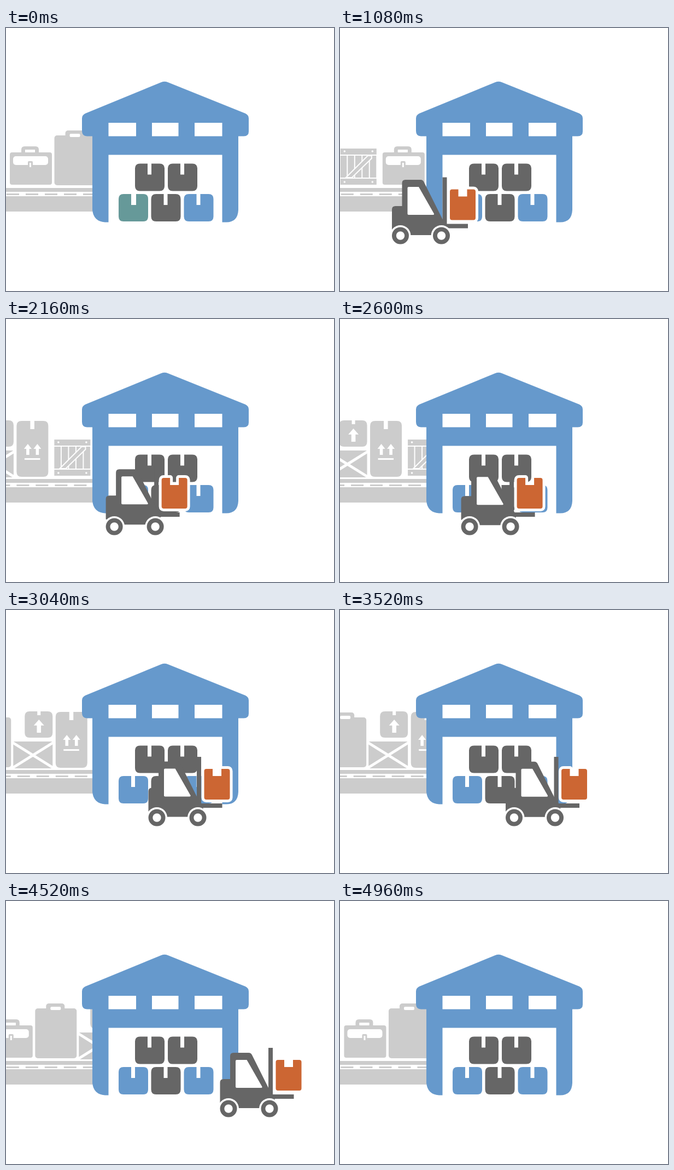
Write an HTML page that moves like this. It is 600 px wide and 480 px high and loops after 5 s.

```html
<!DOCTYPE html>
<html lang="en">
<head>
<meta charset="utf-8">
<title>Warehouse</title>
<style>
html, body { margin: 0; width: 100%; height: 100%; overflow: hidden; background: #fff; }
svg { display: block; width: 600px; height: 480px; }
</style>
</head>
<body>
<svg id="stage" viewBox="0 0 600 480"></svg>
<script>
const LOOP = 5000, STEP = 40;
const BELT_START = 207, BELT_SPEED = 0.0811, BELT_LOOP = 385;
const GREY = '#ccc', DARK = '#666', BLUE = '#69c', TEAL = '#699', ORANGE = '#c63';

const rect = (x, y, w, h, fill, r = 0) =>
  `<rect x="${x}" y="${y}" width="${w}" height="${h}" rx="${r}" fill="${fill}"/>`;
const path = (d, fill, extra = '') => `<path d="${d}" fill="${fill}" ${extra}/>`;
const circle = (x, y, r, fill) => `<circle cx="${x}" cy="${y}" r="${r}" fill="${fill}"/>`;
const group = (id, body) => `<g id="${id}">${body}</g>`;
const shift = (x, y, body) => `<g transform="translate(${x} ${y})">${body}</g>`;

// Rounded carton outline with a slot cut into its top edge
const carton = (x, y, w, h, r, sx, sw, sh) =>
  `M${x + r} ${y}H${x + sx}v${sh}h${sw}v${-sh}H${x + w - r}q${r} 0 ${r} ${r}` +
  `V${y + h - r}q0 ${r} ${-r} ${r}H${x + r}q${-r} 0 ${-r} ${-r}V${y + r}q0 ${-r} ${r} ${-r}Z`;
const stackBox = (x, y, fill, sw = 7) => path(carton(x, y, 54, 50, 9, 23, sw, 20), fill);

const arrow = (x, y, w, h) =>
  path(`M${x} ${y}l${w / 2} ${h * .45}h${-w * .3}V${y + h}h${-w * .4}v${-h * .55}h${-w * .3}Z`, '#fff');

const briefcase =
  rect(0, 227, 77, 59, GREY, 4) +
  path('M21 228V222Q21 216 27 216H47Q53 216 53 222V228H46V222H28V228Z', GREY) +
  rect(28, 222, 18, 5, '#fff', 2) +
  rect(6, 234, 64, 16, '#fff', 5) +
  rect(33, 243, 9, 11, GREY, 2) + rect(36, 246, 3, 8, '#fff');

const suitcase =
  rect(0, 196, 76, 91, GREY, 5) + rect(20, 187, 34, 14, GREY, 5) + rect(28, 193, 19, 6, '#fff', 2);

const crate = (() => {
  let s = rect(0, 220, 66, 11, GREY) + rect(0, 275, 66, 11, GREY);
  for (let i = 0; i < 5; i++) s += rect(i * 13.5, 233, 11.5, 40, GREY);
  s += path('M10 273L50 233H57V238L21 273Z', GREY, 'stroke="#fff" stroke-width="2"');
  for (const x of [7.5, 58.5]) s += circle(x, 225, 1.8, '#fff') + circle(x, 281, 1.8, '#fff');
  return s;
})();

const tallBox =
  path(carton(0, 186, 58, 102, 9, 25, 7.5, 15), GREY) +
  arrow(20.5, 228, 14, 20) + arrow(38, 228, 14, 20) + rect(14.5, 254, 28.5, 3, '#fff');

const crossBox =
  rect(0, 240, 72, 49, GREY, 2) +
  path('M-1 242L73 288M-1 288L73 242', 'none', 'stroke="#fff" stroke-width="5"') +
  path(carton(21, 185, 51, 48, 9, 23, 6, 7), GREY) + arrow(47, 200, 19, 24);

const cargo =
  shift(88.5, 0, suitcase) + shift(7, 0, briefcase) + shift(-70, 0, crate) +
  shift(-139, 0, tallBox) + shift(-216.5, 0, crossBox);

let dashes = '';
const DASH = BELT_LOOP / 11;
for (let i = -1; i < 6; i++) dashes += rect(1 + i * DASH, 302, 23, 3, GREY);

const belt =
  `<g clip-path="url(#left)">${rect(0, 292, 170, 7, GREY)}${rect(0, 307, 170, 28, GREY)}` +
  group('dashes', dashes) + group('cargo', cargo + shift(-BELT_LOOP, 0, cargo)) + '</g>';

const building =
  path('M187 231H396V355H187Z', '#fff') +
  path('M284 99Q290 96.500 296 99L438 156Q444 159 444 165V189Q444 197.500 435 197.500H425V332' +
    'Q424 354.500 403 354.500H395.500V231.500H187.500V354.500H181Q160 353 158 332V197.500H148' +
    'Q139 197 139 188V165Q139 159 145 156Z', BLUE) +
  rect(187.5, 173, 50.5, 24.5, '#fff') + rect(267, 173, 48.5, 24.5, '#fff') +
  rect(345, 173, 50.5, 24.5, '#fff');

const stack =
  stackBox(236, 247.5, DARK) + stackBox(296, 247.5, DARK) +
  group('plain', stackBox(206, 303, BLUE)) + group('tinted', stackBox(206, 303, TEAL, 9)) +
  stackBox(265.5, 303, DARK) + stackBox(325.5, 303, BLUE);

const wheel = x =>
  circle(x, 379, 19, '#fff') + circle(x, 379, 15.5, DARK) + circle(x, 379, 7.7, '#fff');

const load = carton(86.5, 290, 47, 56, 4, 15.5, 16, 13);
const carriage =
  path('M73 268H81V353H119.500V361H82L73 350Z', DARK) +
  path(load, ORANGE, 'stroke="#fff" stroke-width="10" stroke-linejoin="round"') +
  path(load, ORANGE);

const cab =
  path('M-15.500 368V331Q-15.500 325 -9 325H3V283Q3 277 9 277H37Q41 277 43 281L77 349' +
    'Q84 353 85 364L75 378H0Z', DARK) +
  path('M13 292Q13 290 15 290H33.500L61.500 339Q62 341 60 341H15Q13 341 13 339Z', '#fff');

const $ = id => document.getElementById(id);
$('stage').innerHTML =
  '<clipPath id="left"><rect x="0" y="0" width="170" height="480"/></clipPath>' +
  belt + building + stack +
  group('truck', group('carriage', carriage) + group('cab', cab) + wheel(0) + wheel(75));

// Tables of [time, value], joined by straight lines
const DRIVE = [[580, -150], [760, 50], [960, 116], [1080, 110.5], [1170, 110.5], [5000, 449.5]];
const BOB = [[1080, 0], [1600, -2], [2160, -2.8], [3040, -.5], [4040, 0]];
const FORK_X = [[1080, 4], [1240, 0]];
const FORK_Y = [[1080, 4.5], [1240, 0]];

function at(keys, t) {
  if (t <= keys[0][0]) return keys[0][1];
  for (let i = 1; i < keys.length; i++) {
    const [t0, a] = keys[i - 1], [t1, b] = keys[i];
    if (t <= t1) return a + (b - a) * (t - t0) / (t1 - t0);
  }
  return keys[keys.length - 1][1];
}

const move = (id, x, y = 0) => $(id).setAttribute('transform', `translate(${x} ${y})`);
const show = (id, on) => $(id).setAttribute('visibility', on ? 'visible' : 'hidden');

function draw(now) {
  const t = Math.floor((now % LOOP) / STEP) * STEP;
  const d = Math.max(0, t - BELT_START) * BELT_SPEED;
  move('cargo', d);
  move('dashes', d % DASH);
  show('plain', t >= STEP);
  show('tinted', t < STEP);
  show('truck', t >= 600 && t < 4960);
  move('truck', at(DRIVE, t));
  move('carriage', at(FORK_X, t), at(FORK_Y, t));
  move('cab', 0, at(BOB, t));
}

const start = performance.now();
function tick() {
  draw(performance.now() - start);
  requestAnimationFrame(tick);
}
tick();
</script>
</body>
</html>
```
